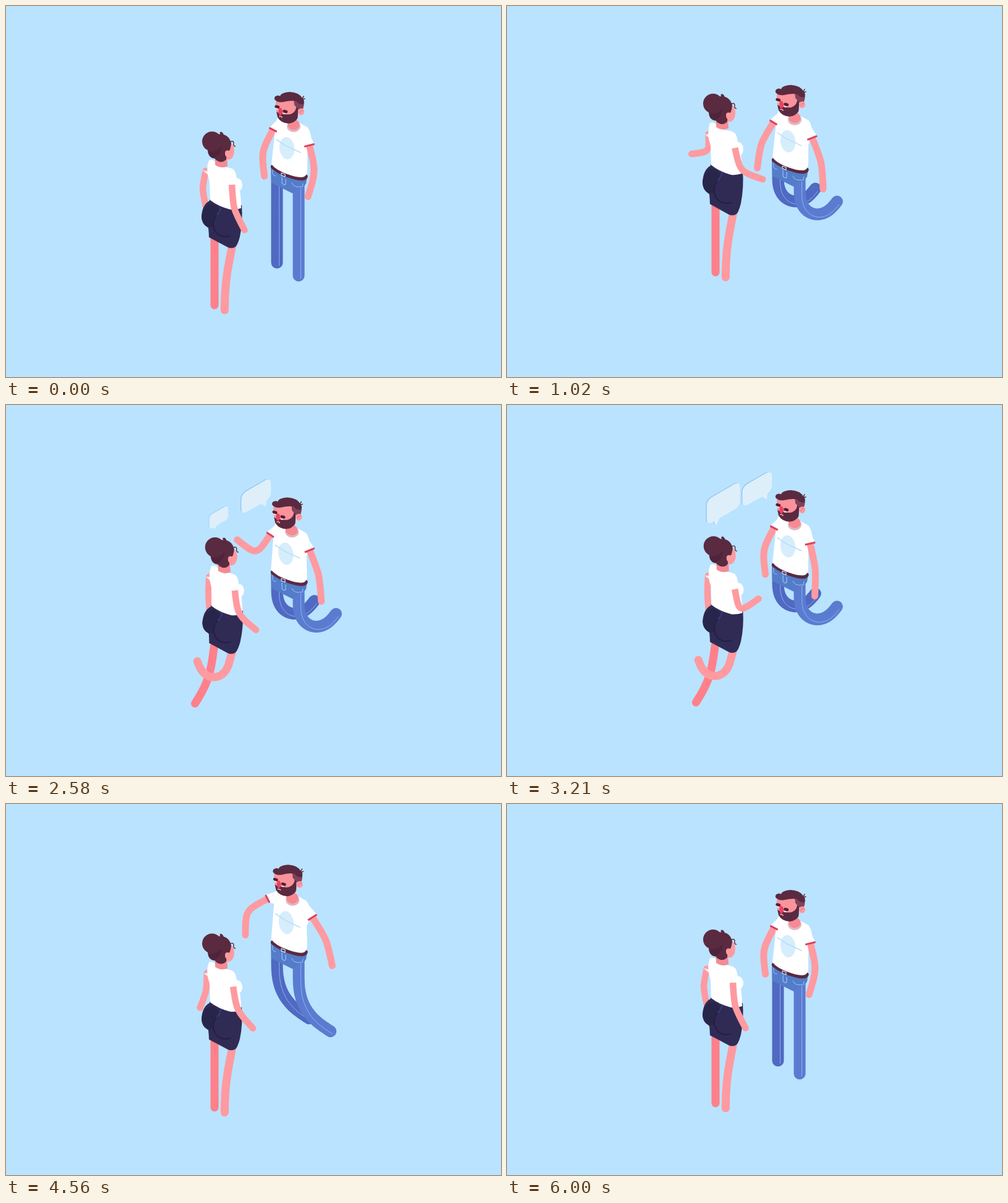
Animation of 800x600 px, one loop 6030 ms. Source, as an HTML page with a canvas:

```html
<!DOCTYPE html>
<html>
<head>
<meta charset="utf-8">
<style>
html, body { margin: 0; width: 100%; height: 100%; overflow: hidden; background: #bae3ff; }
canvas { display: block; }
</style>
</head>
<body>
<canvas id="stage" width="800" height="600"></canvas>
<script>
const ctx = document.getElementById('stage').getContext('2d');
const LOOP = 6030;
const SKIN = '#ff9aa0', SHADE = '#ff808a', HAIR = '#5a2a40', TRIM = '#d9415f';
const JEAN = '#5b7bd0', JEAN_BACK = '#5069c2', SEAM = '#94c4fa', SKIRT = '#302b54';

// Timing
function ramp(t, a, b) {
  const u = Math.min(1, Math.max(0, (t - a) / (b - a)));
  return u * u * (3 - 2 * u);
}
const span = (t, a, b, c, d) => ramp(t, a, b) * (1 - ramp(t, c, d));
const bump = (t, a, b) => t > a && t < b ? Math.sin(Math.PI * (t - a) / (b - a)) ** 2 : 0;
const wave = (t, top, period) => Math.cos(2 * Math.PI * (t - top) / period);
const mix = (a, b, u) => a + (b - a) * u;

// Eases from gesture to gesture; each move is [time, gesture].
function act(t, first, ...moves) {
  return moves.reduce((now, [at, next]) =>
    now.map((v, i) => mix(v, next[i], ramp(t, at, at + 330))), first);
}

// Shapes
function fill(color, d) {
  ctx.fillStyle = color;
  ctx.fill(new Path2D(d));
}
function line(color, w, d, cap = 'round') {
  ctx.strokeStyle = color;
  ctx.lineWidth = w;
  ctx.lineCap = cap;
  ctx.lineJoin = 'round';
  ctx.stroke(new Path2D(d));
}
function oval(color, x, y, rx, ry, turn = 0) {
  ctx.fillStyle = color;
  ctx.beginPath();
  ctx.ellipse(x, y, rx, ry, turn, 0, 7);
  ctx.fill();
}

// Angles are in degrees from straight down, positive to the right.
const dir = deg => [Math.sin(deg * Math.PI / 180), Math.cos(deg * Math.PI / 180)];
const step = (p, deg, len) => {
  const d = dir(deg);
  return [p[0] + d[0] * len, p[1] + d[1] * len];
};

// An arm hangs from its shoulder at an angle and turns at the elbow.
function makeArm(shoulder, [angle, turn], cuffAt, half) {
  const cuff = step(shoulder, angle, cuffAt);
  const elbow = step(cuff, angle, half);
  return { angle, cuff, elbow, hand: step(elbow, angle + turn, half) };
}
function drawArm(a, w) {
  line(SKIN, w, `M${a.cuff}C${a.elbow},${a.elbow},${a.hand}`);
}
function sleeve(color, arm, half, left, right, trim) {
  const c = step(arm.cuff, arm.angle - 90, half), d = step(arm.cuff, arm.angle + 90, half);
  fill(color, `M${left}L${c}L${d}L${right}Z`);
  if (trim) line(TRIM, 3, `M${c}L${d}`, 'butt');
}

// A leg leaves the hip straight, then curls smoothly by the given turn.
function drawLeg(color, w, hip, len, angle, turn, seam) {
  const steps = 30, pts = [hip];
  for (let i = 0; i < steps; i++) {
    pts.push(step(pts[i], angle + turn * ramp((i + 0.5) / steps, 0.16, 1), len / steps));
  }
  line(color, w, 'M' + pts.join('L'));
  if (seam) line(seam, 0.8, 'M' + pts.map(p => [p[0] + 3.5, p[1] + 4.5]).join('L'));
}

// Torso shear and stretch above a fixed height.
function bend(pivot, lean, grow) {
  return {
    at: (x, y) => [x + lean * (pivot - y), y - grow * (pivot - y)],
    apply: () => ctx.transform(1, 0, -lean, 1 + grow, lean * pivot, -grow * pivot)
  };
}

function bubble(x, y, w, h, tail, ax, ay, scale) {
  if (scale < 0.01) return;
  ctx.save();
  ctx.translate(ax, ay);
  ctx.scale(scale, scale);
  ctx.translate(x - ax, y - ay);
  const face = (color, ox, oy) => {
    ctx.save();
    ctx.transform(1, -0.577, 0, 1, ox, oy);
    ctx.fillStyle = color;
    ctx.beginPath();
    ctx.roundRect(0, 0, w, h, 8);
    ctx.fill();
    const tip = tail < w / 2 ? tail - 2 : tail + 4;
    fill(color, `M${tail - 5} ${h - 1}H${tail + 5}L${tip} ${h + 9}Z`);
    ctx.restore();
  };
  face('#8ec3f0', 0, 0);
  face('#eff8fe', 1.8, 1);
  face('#deeffa', 1.3, 0.6);
  ctx.restore();
}

function manHead() {
  fill('#f58a93', 'M455 178L470 178L473 194Q466 202 457 195Z');
  fill('#fa939b', 'M437 154Q455 148 472 153L473 180Q462 189 448 187Q436 178 437 154Z');
  fill('#80425a', 'M466 150L481 150Q484 158 481 166L474 168L467 160Z');
  fill(HAIR, 'M438 171Q443 175 449 174Q459 178 466 172Q470 168 470 163L473 166Q473 176 472 182Q466 190 457 190Q445 189 440 180Z');
  oval(SKIN, 478, 171, 5, 5.5);
  line('#f27c88', 1.4, 'M476 173Q477 168 481 169');
  fill(HAIR, 'M435 151Q434 146 439 145Q442 144 444 146Q445 140 460 139Q475 140 480 149Q484 152 482 159Q475 160 470 154Q462 152 450 155Q440 157 435 151Z');
  line(HAIR, 1.5, 'M479 151L482 146M479 151L484 150');
  line('#fff', 1.4, 'M438 166L440 167M449 174L452 174.5');
  fill('#ea4262', 'M442 165Q447 164 448 170Q448 176 444 177Q440 175 442 165Z');
  line('#4d2338', 4.5, 'M437.5 162.5L441 163.5M450.5 170L454 171');
  line(SKIN, 1.8, 'M443 178.5Q446 178 447 180');
}

const manLeft = { rest: [-28, 35], loose: [-32, 25], talk: [-34, -130], hip: [-38, 82], out: [-78, 50] };
const manRight = { rest: [14, -31], loose: [22, -20], hang: [13, -16], out: [45, -24], up: [72, -30] };

function drawMan(t) {
  const curl = span(t, 320, 960, 4390, 4680);
  const trail = span(t, 250, 500, 650, 900) + span(t, 4400, 4680, 4950, 5090);
  const air = span(t, 300, 520, 700, 1060) + span(t, 4400, 4680, 4950, 5090);
  const dy = span(t, 500, 960, 4400, 4900) * (0.5 + 11.5 * wave(t, 2310, 3280)) +
    9 * bump(t, 60, 440) - 114 * bump(t, 240, 1060) - 74 * bump(t, 4400, 5090) + 5 * bump(t, 5060, 5400);
  const lean = -6 * span(t, 1400, 1750, 2400, 2900) - 5 * span(t, 4400, 4700, 4950, 5200);
  const b = bend(278, lean / 125, air * 8.5 / 125);
  const L = manLeft, R = manRight;
  const armL = makeArm(b.at(439, 186), act(t, L.rest, [220, L.out], [690, L.loose], [1350, L.talk],
    [2480, L.loose], [2820, L.rest], [3550, L.hip], [4370, L.out], [4970, L.rest]), 16, 40);
  const armR = makeArm(b.at(485, 204), act(t, R.rest, [180, R.up], [690, R.loose], [1400, R.hang],
    [2500, R.up], [2850, R.hang], [4370, R.out], [4940, R.up], [5280, R.rest]), 22, 43);
  const legLen = 148 - 33 * curl - Math.max(dy, 0) * (1 - curl);
  const legTurn = 142 * curl + 14 * trail * (1 - curl);

  ctx.save();
  ctx.translate(0, dy);
  drawLeg(JEAN_BACK, 19, [438, 267], legLen, 0, legTurn, SEAM);
  drawLeg(JEAN, 19, [473, 288], legLen, 0, legTurn, SEAM);
  fill('#547cc9', 'M428 258L487 274L485 287Q482 293 473 295L463 303L429 286Z');
  line(SEAM, 1, 'M431 265Q429 275 436 275M462 286Q465 295 479 292M480 287L479 292');
  line(HAIR, 8, 'M432 260Q446 271 466 276.5Q481 280.5 483.5 276');
  line('#d5eafc', 1.2, 'M445 270L451 272L451 276L445 274Z');
  line(SEAM, 1.2, 'M446 277L446 286Q449 291 452 288L452 280');
  drawArm(armL, 11);

  ctx.save();
  b.apply();
  fill('#fff', 'M440 179Q436 184 435 200L429 256Q437 266 455 272Q474 279 482 276Q487 273 487 266L487 235L494 222Q493 202 487 196L474 189Q456 193 440 179Z');
  oval('#d6edfc', 454, 230, 12, 18, -0.12);
  line('#b8e0fa', 1.6, 'M437 216L452 226L476 237');
  oval('#e2b6c1', 465, 195, 11, 9);
  oval('#f58a93', 465, 192, 9.5, 8.5);
  ctx.restore();
  sleeve('#fff', armL, 7, b.at(443, 180), b.at(437, 201), true);
  drawArm(armR, 11);
  sleeve('#fff', armR, 8.5, b.at(485, 223), b.at(482, 193), true);

  const neck = b.at(460, 165);
  ctx.translate(neck[0] - 461, neck[1] - 165);
  manHead();
  ctx.restore();
  return dy;
}

function ladyHead() {
  fill('#f58a93', 'M338 245L357 245L358 259Q348 264 338 257Z');
  oval(SKIN, 359.5, 234.5, 9.5, 14);
  fill(HAIR, 'M327 228Q331 208 348 207Q361 209 364 222Q363 231 361 234Q354 232 354 238Q357 243 356 248Q352 253 345 252Q338 249 338 247Q325 245 326 230Z');
  fill('#4f243a', 'M327 236Q341 236 349 226Q347 243 334 246Q327 243 327 236Z');
  oval(HAIR, 333, 219, 16, 16);
  line(HAIR, 4, 'M347.5 205.5Q350 207 350 211');
  oval(SKIN, 357.5, 239, 3.5, 5);
  line(HAIR, 1.4, 'M362 220Q367 217 368 221Q367 227 370.5 227');
}

const ladyLeft = { rest: [-12, 24], out: [3, -87], low: [2, -65], hang: [-3, 8] };
const ladyRight = { rest: [3, 25], out: [12, 59], talk: [8, 138], half: [10, 116], hang: [6, 27], low: [12, 45] };

function drawLady(t) {
  const curl = span(t, 1180, 1600, 4250, 4520);
  const air = span(t, 800, 1000, 1250, 1600) + 0.65 * span(t, 4520, 4760, 4950, 5130);
  const dy = span(t, 1300, 1640, 4480, 4900) * (9 + 3 * wave(t, 2800, 1700)) +
    3 * bump(t, 560, 960) - 96 * bump(t, 795, 1640) + 11 * bump(t, 1450, 1850) - 45 * bump(t, 4500, 5140);
  const lean = 6 * span(t, 1300, 1750, 2200, 3500);
  const b = bend(385, lean / 160, air * 9 / 180);
  const L = ladyLeft, R = ladyRight;
  const armL = makeArm(b.at(325, 256), act(t, L.rest, [650, L.out], [1320, L.hang],
    [4420, L.low], [5000, L.rest]), 11, 29);
  const armR = makeArm(b.at(364, 268), act(t, R.rest, [650, R.out], [1320, R.talk], [2150, R.hang],
    [2500, R.talk], [2850, R.half], [3500, R.hang], [4420, R.low], [5000, R.rest]), 21, 39);
  const swing = 24 + 14 * bump(t, 1250, 2350);

  ctx.save();
  ctx.translate(0, dy);
  drawLeg(SHADE, 13, [337, 375], 109 - 6 * curl, -8 * curl, -swing * curl);
  drawLeg(SKIN, 13, [366, 386], 107 - 10 * curl, mix(-11, -15, curl), mix(10, -145, curl));
  drawArm(armL, 10.5);

  ctx.save();
  b.apply();
  fill(SKIRT, 'M329 313L357 324L381 322Q383 349 378 373Q374 388 370 390Q364 393 358 390L328 374Q328 368 327 359Q316 352 316 341Q317 321 329 315Z');
  oval('#28254b', 331, 339, 14.5, 19, 0.2);
  oval(SKIRT, 354, 351, 20, 21);
  line('#231f45', 2.2, 'M340 338Q331 350 338 364Q346 376 362 372');
  line('#3d4198', 1.2, 'M348 322Q347 331 341 338');
  ctx.restore();

  sleeve('#eaf6ff', armL, 5.5, b.at(333, 278), b.at(328, 249));
  ctx.save();
  b.apply();
  fill('#fff', 'M328 249Q334 247 338 252Q345 261 358 261Q369 262 371 270L374 282Q380 300 380 327Q371 330 362 329Q343 324 330 314L329 284Q322 264 328 249Z');
  oval('#fff', 373.5, 289.5, 8.5, 11);
  ctx.restore();
  drawArm(armR, 10.5);
  sleeve('#fff', armR, 6, b.at(358, 264), b.at(370, 267));

  const neck = b.at(346, 225);
  ctx.translate(neck[0] - 346, neck[1] - 225);
  ladyHead();
  ctx.restore();
  return dy;
}

function draw(t) {
  ctx.fillStyle = '#bae3ff';
  ctx.fillRect(0, 0, 800, 600);
  const manY = drawMan(t), ladyY = drawLady(t);
  bubble(379, 133 + manY, 47, 33, 35, 420, 160 + manY, span(t, 1390, 1560, 3260, 3420));
  bubble(321.5, 144 + ladyY, 53, 40, 16, 336, 197 + ladyY, span(t, 2500, 2650, 3960, 4110));
}

function tick(now) {
  draw(now % LOOP);
  requestAnimationFrame(tick);
}
draw(0);
requestAnimationFrame(tick);
</script>
</body>
</html>
```
